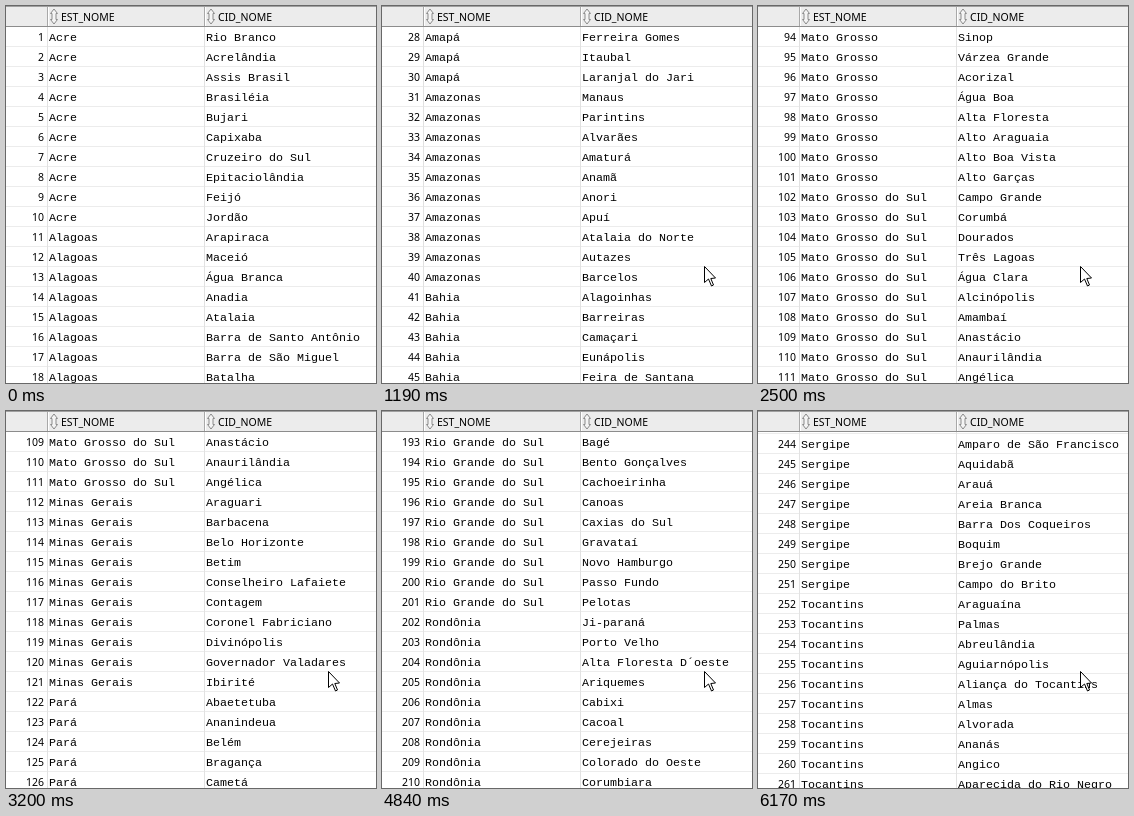
Recreate the animation shown at these times as an HTML page with a canvas. Size 370x377 px, loop 6.35 s.

```html
<!DOCTYPE html>
<html lang="pt">
<head>
<meta charset="utf-8">
<style>
html, body { margin: 0; width: 100%; height: 100%; overflow: hidden; background: #fff; }
canvas { display: block; }
</style>
</head>
<body>
<canvas id="stage" width="370" height="377"></canvas>
<script>
const W = 370, H = 377, LOOP = 6350, ROW = 20, HEAD = 21, MAX_SCROLL = 4858;
const MONO = '11.667px "Liberation Mono", monospace';
const SANS = '10.5px "Noto Sans", sans-serif';

const DATA = `Acre:Rio Branco,Acrelândia,Assis Brasil,Brasiléia,Bujari,Capixaba,Cruzeiro do Sul,Epitaciolândia,Feijó,Jordão
Alagoas:Arapiraca,Maceió,Água Branca,Anadia,Atalaia,Barra de Santo Antônio,Barra de São Miguel,Batalha,Belém,Belo Monte
Amapá:Macapá,Oiapoque,Pedra Branca do Amapari,Santana,Amapá,Calçoene,Cutias,Ferreira Gomes,Itaubal,Laranjal do Jari
Amazonas:Manaus,Parintins,Alvarães,Amaturá,Anamã,Anori,Apuí,Atalaia do Norte,Autazes,Barcelos
Bahia:Alagoinhas,Barreiras,Camaçari,Eunápolis,Feira de Santana,Ilhéus,Itabuna,Jequié,Juazeiro,Lauro de Freitas
Ceará:Caucaia,Crato,Fortaleza,Iguatu,Itapipoca,Juazeiro do Norte,Maracanaú,Maranguape,Quixadá,Sobral
Distrito Federal:Brasília
Espírito Santo:Cachoeiro de Itapemirim,Cariacica,Colatina,Guarapari,Linhares,São Mateus,Serra,Vila Velha,Vitória,Afonso Cláudio
Goiás:Águas Lindas de Goiás,Anápolis,Aparecida de Goiânia,Catalão,Formosa,Goiânia,Itumbiara,Luziânia,Rio Verde,Valparaíso de Goiás
Maranhão:Açailândia,Bacabal,Balsas,Caxias,Codó,Imperatriz,Paço do Lumiar,São José de Ribamar,São Luís,Timon
Mato Grosso:Cuiabá,Rondonópolis,Sinop,Várzea Grande,Acorizal,Água Boa,Alta Floresta,Alto Araguaia,Alto Boa Vista,Alto Garças
Mato Grosso do Sul:Campo Grande,Corumbá,Dourados,Três Lagoas,Água Clara,Alcinópolis,Amambaí,Anastácio,Anaurilândia,Angélica
Minas Gerais:Araguari,Barbacena,Belo Horizonte,Betim,Conselheiro Lafaiete,Contagem,Coronel Fabriciano,Divinópolis,Governador Valadares,Ibirité
Pará:Abaetetuba,Ananindeua,Belém,Bragança,Cametá,Castanhal,Itaituba,Marabá,Parauapebas,Santarém
Paraíba:Bayeux,Cabedelo,Cajazeiras,Campina Grande,João Pessoa,Patos,Santa Rita,Sapé,Sousa,Água Branca
Paraná:Almirante Tamandaré,Apucarana,Arapongas,Araucária,Campo Largo,Cascavel,Colombo,Curitiba,Foz do Iguaçu,Guarapuava
Pernambuco:Cabo de Santo Agostinho,Camaragibe,Caruaru,Garanhuns,Igarassu,Jaboatão Dos Guararapes,Olinda,Paulista,Petrolina,Recife
Piauí:Parnaíba,Teresina,Acauã,Agricolândia,Água Branca,Alagoinha do Piauí,Alegrete do Piauí,Alto Longá,Altos,Alvorada do Gurguéia
Rio de Janeiro:Angra Dos Reis,Barra Mansa,Belford Roxo,Cabo Frio,Campos Dos Goytacazes,Duque de Caxias,Itaboraí,Itaguaí,Macaé,Magé
Rio Grande do Norte:Caicó,Ceará-mirim,Macaíba,Mossoró,Natal,Parnamirim,Acari,Açu,Afonso Bezerra,Água Nova
Rio Grande do Sul:Alvorada,Bagé,Bento Gonçalves,Cachoeirinha,Canoas,Caxias do Sul,Gravataí,Novo Hamburgo,Passo Fundo,Pelotas
Rondônia:Ji-paraná,Porto Velho,Alta Floresta D´oeste,Ariquemes,Cabixi,Cacoal,Cerejeiras,Colorado do Oeste,Corumbiara,Costa Marques
Roraima:Boa Vista,Alto Alegre,Amajari,Bonfim,Cantá,Caracaraí,Caroebe,Iracema,Mucajaí,Normandia
Santa Catarina:Balneário Camboriú,Blumenau,Brusque,Chapecó,Criciúma,Florianópolis,Itajaí,Jaraguá do Sul,Joinville,Lages
São Paulo:Americana,Araçatuba,Araraquara,Barueri,Bauru,Campinas,Carapicuíba,Cotia,Diadema,Embu
Sergipe:Aracaju,Nossa Senhora do Socorro,Amparo de São Francisco,Aquidabã,Arauá,Areia Branca,Barra Dos Coqueiros,Boquim,Brejo Grande,Campo do Brito
Tocantins:Araguaína,Palmas,Abreulândia,Aguiarnópolis,Aliança do Tocantins,Almas,Alvorada,Ananás,Angico,Aparecida do Rio Negro`;

const rows = DATA.split('\n').flatMap(line => {
  const [state, cities] = line.split(':');
  return cities.split(',').map(city => [state, city]);
});

// Wheel bursts: start, end, rows moved by each step
const BURSTS = [
  [670, 1190, '33333633'],
  [1550, 1880, '366666'],
  [2240, 2500, '36996'],
  [3060, 3460, '3666663'],
  [3820, 4150, '366663'],
  [4580, 4840, '36996'],
  [5270, 5530, '36996'],
  [5960, 6170, '3663']
];

const ctx = document.getElementById('stage').getContext('2d');

const stepTime = (start, end, i, count) =>
  Math.floor((start + (end - start) * i / (count - 1)) / 10) * 10;

function scrollAt(t) {
  let moved = 0;
  for (const [start, end, steps] of BURSTS)
    [...steps].forEach((n, i) => {
      if (t >= stepTime(start, end, i, steps.length)) moved += +n;
    });
  return Math.min(moved * ROW, MAX_SCROLL);
}

function rect(color, x, y, w, h) {
  ctx.fillStyle = color;
  ctx.fillRect(x, y, w, h);
}

function label(text, x, y, font, align = 'left') {
  ctx.font = font;
  ctx.textAlign = align;
  ctx.fillStyle = '#000';
  ctx.fillText(text, x, y);
}

function shape(x, y, points, fill, stroke) {
  ctx.beginPath();
  points.forEach(([px, py]) => ctx.lineTo(x + px, y + py));
  ctx.closePath();
  ctx.fillStyle = fill;
  ctx.strokeStyle = stroke;
  ctx.lineWidth = 1;
  ctx.fill();
  ctx.stroke();
}

function drawRows(scroll) {
  for (let i = Math.floor(scroll / ROW); i < rows.length; i++) {
    const y = HEAD + i * ROW - scroll;
    if (y > H) break;
    rect('#ececec', 0, y + 19, W, 1);
    label(i + 1, 38, y + 14, SANS, 'right');
    label(rows[i][0], 43, y + 14, MONO);
    label(rows[i][1], 200, y + 14, MONO);
  }
  rect('#e2e2e2', 41, HEAD, 1, H);
  rect('#e2e2e2', 198, HEAD, 1, H);
}

const SORT = [[0, 3], [3.5, 7.5], [2, 7.5], [2, 13.5], [3.5, 13.5], [0, 18],
  [-3.5, 13.5], [-2, 13.5], [-2, 7.5], [-3.5, 7.5]];

function drawHeader() {
  rect('#ececec', 0, 0, W, HEAD);
  rect('#a0a0a0', 0, 0, W, 1);
  rect('#8c8c8c', 0, 20, W, 1);
  [[41, 'EST_NOME'], [198, 'CID_NOME']].forEach(([x, title]) => {
    rect('#a8a8a8', x, 1, 1, 19);
    rect('#fff', x + 1, 1, 1, 19);
    shape(x + 7, 0, SORT, '#f4f4f4', '#8a8a8a');
    label(title, x + 14, 15, SANS);
  });
}

const ARROW = [[0, 0], [0, 16], [4, 12.5], [7, 19.5], [9, 18.5], [6.3, 12], [11, 11.5]];

function drawCursor(t) {
  if (t < 160) return;
  const step = Math.min(5, Math.floor((t - 160) / 66));
  const rest = (1 - step / 5) ** 1.5;
  shape(Math.round(322 - 30 * rest) + .5, Math.round(260 + 108 * rest) + .5, ARROW, '#fff', '#000');
}

let origin;
function frame(now) {
  origin ??= now;
  const t = (now - origin) % LOOP;
  rect('#fff', 0, 0, W, H);
  drawRows(scrollAt(t));
  drawHeader();
  drawCursor(t);
  requestAnimationFrame(frame);
}
requestAnimationFrame(frame);
</script>
</body>
</html>
```
